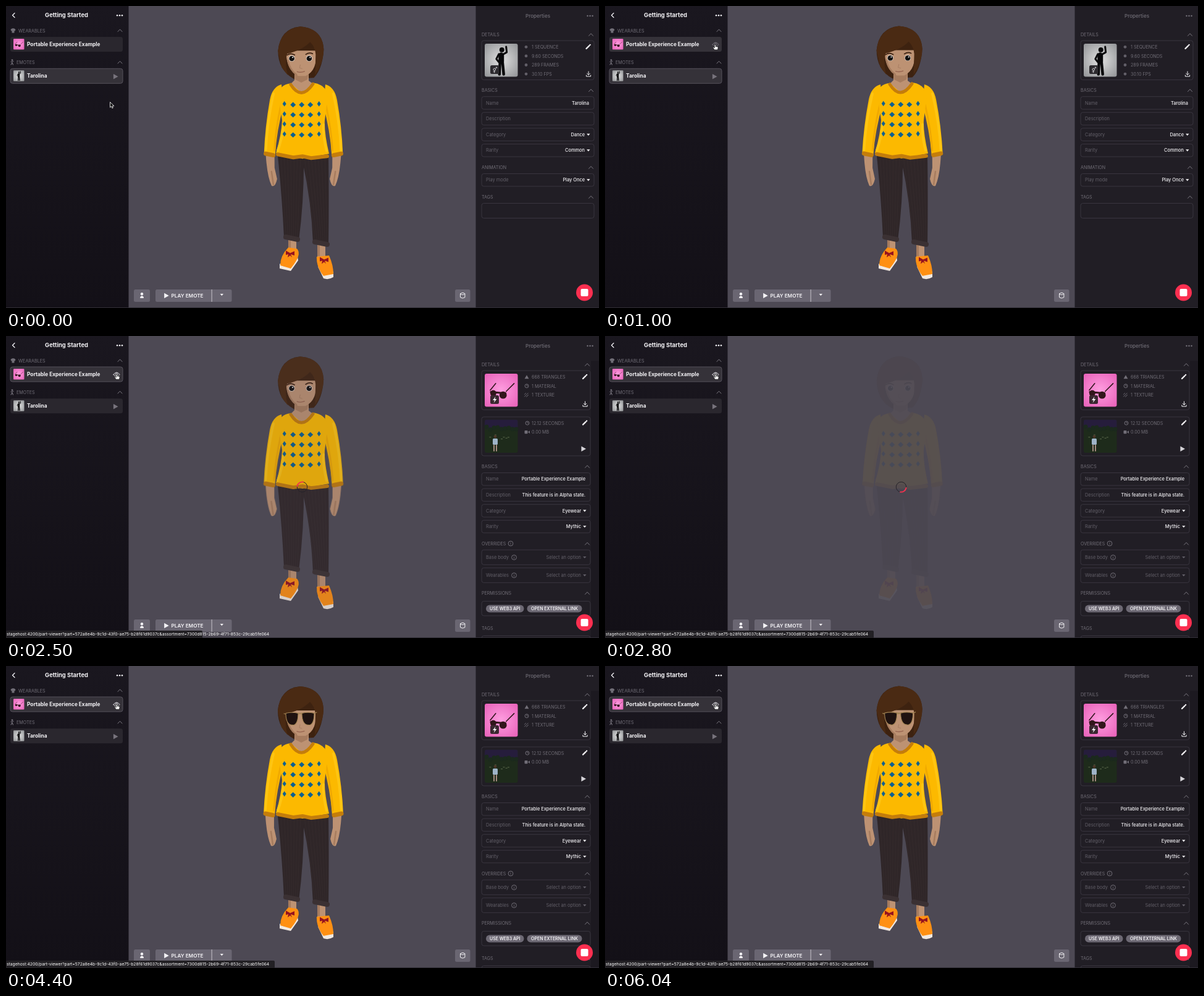
An HTML page for the animation above (6.17 s loop, 960 by 489 pixels).

```html
<!DOCTYPE html>
<html lang="en">
<head>
<meta charset="utf-8">
<title>Item editor</title>
<style>
html, body { margin: 0; width: 100%; height: 100%; overflow: hidden; background: #18141b; }
svg { display: block; width: 100vw; height: 100vh; font-family: Inter, sans-serif; }
</style>
</head>
<body>
<svg id="stage" viewBox="0 0 960 489"></svg>
<script>
const LOOP = 6170, SELECT = 2400, READY = 3600;
const GREY = '#716e77', DIM = '#625f68', WHITE = '#f4f3f6', LINE = '#39353f';

// ---- markup helpers ----
const shape = (d, fill) => `<path d="${d}" fill="${fill}"/>`;
const line = (d, stroke, width = 1, fill = 'none') =>
  `<path d="${d}" fill="${fill}" stroke="${stroke}" stroke-width="${width}" stroke-linecap="round" stroke-linejoin="round"/>`;
const rect = (x, y, w, h, fill, r = 0, stroke = 'none') =>
  `<rect x="${x}" y="${y}" width="${w}" height="${h}" rx="${r}" fill="${fill}" stroke="${stroke}"/>`;
const circle = (x, y, r, fill, stroke = 'none') =>
  `<circle cx="${x}" cy="${y}" r="${r}" fill="${fill}" stroke="${stroke}"/>`;
const text = (x, y, s, size = 7.1, fill = GREY, weight = 400, anchor = 'start') =>
  `<text x="${x}" y="${y}" font-size="${size}" fill="${fill}" font-weight="${weight}" text-anchor="${anchor}">${s}</text>`;
const group = (id, body) => `<g id="${id}">${body}</g>`;
const at = (x, y, body, scale = 1) => `<g transform="translate(${x} ${y}) scale(${scale})">${body}</g>`;
const mirror = (axis, body) => `<g transform="translate(${2 * axis} 0) scale(-1 1)">${body}</g>`;
const repeat = (n, fn) => Array.from({ length: n }, (_, i) => fn(i)).join('');
const mix = (a, b, k) => a + (b - a) * k;

// ---- icons ----
const chevron = (x, y) => at(x, y, line('M-3.5 2L0-1.7 3.5 2', '#85828b', .9));
const caret = (x, y, fill = WHITE) => at(x, y, shape('M-2.7-1.4H2.7L0 1.8Z', fill));
const playMark = (x, y, fill) => at(x, y, shape('M-3.6-4.2L4 0-3.6 4.2Z', fill));
const dots = (x, y, fill) => repeat(3, i => circle(x + 4 * (i - 1), y, 1.25, fill));
const pencil = (x, y) => at(x, y, line('M-3 3L1.5-1.5M3-3L3.1-3.1', WHITE, 2.4));
const download = (x, y) => at(x, y, line('M0-4V1.5M-2.4-.8L0 1.6 2.4-.8M-3.6 2v2h7.2V2', WHITE));
const info = (x, y) => circle(x, y, 3.9, 'none', GREY) + text(x, y + 2.2, 'i', 6, GREY, 500, 'middle');
const clock = (x, y) => at(x, y, circle(0, 0, 3, 'none', GREY) + line('M0-2V0H1.5', GREY, .8));
const eye = (x, y) => at(x, y, line('M-5 0Q0-7 5 0Q0 7-5 0Z', 'currentColor') + circle(0, 0, 1.9, 'none', 'currentColor'));

const INK = '#08080a', LENS = '#32161c';
const posing = circle(1, -17, 4, INK) + line('M0-8V2', INK, 9) +
  line('M-2 2L-3 23M2 2L4 23', INK, 4.5) + line('M4-10L9-13 8-22M-4-10L-8-2-4 3', INK, 3);
const shades = line('M8 2L21-11M-18 0L-9-11', LENS, 1.6) + line('M-17 3L7 5', LENS, 3) +
  circle(-13, 5, 5, LENS) + circle(3, 8, 6, LENS);

const tile = (x, y, size, fill, icon) =>
  rect(x, y, size, size, `url(#${fill})`, size / 18) + at(x + size / 2, y + size / 2, icon, size / 54);

// ---- left bar ----
const row = (id, y, label, thumb) =>
  `<rect id="${id}" x="7" y="${y - 12}" width="182" height="24" rx="3.5"/>` +
  tile(12, y - 9, 17.5, ...thumb) + text(34, y + 3, label, 8.3, WHITE, 700);

const leftBar = rect(0, 0, 198.5, 489, 'url(#bar)') +
  line('M14 11.5L10.5 15l3.5 3.5', WHITE, 1.3) +
  text(98, 18.4, 'Getting Started', 9.4, WHITE, 700, 'middle') + dots(184, 15.3, WHITE) +
  at(11.5, 40, shape('M-4-2L-1.5-3.7H1.5L4-2 3 .5 2 0V3.5H-2V0L-3 .5Z', GREY)) +
  text(20, 42.5, 'WEARABLES', 7.2) + chevron(184.5, 39.5) +
  row('rowA', 62, 'Portable Experience Example', ['pink', shades]) +
  circle(10, 87.6, 1.4, GREY) + line('M8 90.5l4-1M10 90v2l-2 3M10 92l1.5 3', GREY, 1.2) +
  text(17, 93.6, 'EMOTES', 7.2) + chevron(184.5, 91) +
  row('rowB', 113.3, 'Tarolina', ['silver', posing]) +
  playMark(177.5, 114.3, '#77737c') + group('eye', eye(179, 62.4));

// ---- right bar ----
const box = (y, h, right) => rect(770, y - h / 2, right - 770, h, 'none', 3.5, LINE);
const head = (y, title, right) => text(770, y + 2.6, title) + chevron(right - 5, y);
const stats = (y, list, icons) => list.map((s, i) => text(851, y + 14.6 * i + 2.6, s) + at(842.5, y + 14.6 * i, icons(i))).join('');

function field(y, h, right, [label, value, kind = 'plain']) {
  const menu = kind !== 'plain', fill = kind === 'empty' ? DIM : WHITE;
  return box(y, h, right) + text(777, y + 2.7, label, 7.4, DIM) +
    text(right - (menu ? 15 : 8), y + 2.7, value, 7.4, fill, kind === 'empty' ? 400 : 500, 'end') +
    (menu ? caret(right - 9.2, y, fill) : '');
}

// stacks titled sections of equally tall fields
function sections(y, right, list) {
  return list.map(([title, h, rows]) => {
    let out = head(y, title, right);
    y += 10.2 + h / 2;
    rows.forEach((r, i) => { out += field(y, h, right, r); if (i < rows.length - 1) y += h + 5.1; });
    y += h / 2 + 17.3;
    return out;
  }).join('');
}

const gender = line('M1.4-1.3L3.8-3.7H2.2M3.8-3.7v1.6M-.3 2v3M-1.6 3.6h2.6', '#d5d3d8', .8) + circle(0, 0, 1.8, 'none', '#d5d3d8');
const emotePanel = head(46.3, 'DETAILS', 952) + box(87.8, 63.5, 952) + tile(775, 61, 53.5, 'silver', posing) +
  rect(784, 96, 14.5, 14, '#2c2a2e', 2.5) + at(790.8, 102.8, gender) +
  stats(66.3, ['1 SEQUENCE', '9.60 SECONDS', '289 FRAMES', '30.10 FPS'], () => circle(-.5, 0, 2.4, DIM)) +
  pencil(942.5, 66) + download(943, 110) +
  sections(136.5, 952, [
    ['BASICS', 20.5, [['Name', 'Tarolina'], ['Description', ''], ['Category', 'Dance', 'menu'], ['Rarity', 'Common', 'menu']]],
    ['ANIMATION', 20.5, [['Play mode', 'Play Once', 'menu']]],
    ['TAGS', 24, [['', '']]]
  ]);

let seed = 7;
const random = () => (seed = seed * 16807 % 2147483647) / 2147483647;
const clip = rect(775, 135.5, 53.5, 53.5, '#1e2b1b', 3) + rect(775, 135.5, 53.5, 15, '#261d3c', 3) +
  repeat(9, i => circle(778 + i * 6, 147 + random() * 5, 3.5, '#1b291d')) +
  repeat(6, () => rect(780 + random() * 45, 155 + random() * 12, 3, 1.2, '#526044')) +
  circle(792, 163, 2.4, '#4a3427') + rect(788, 166, 8, 10, '#9fb4c8', 1.5) + line('M790 177v9M794 177v9', '#a58a80', 2);

const pill = (x, w, s) => rect(x, 435.5, w, 12, '#6d6974', 6) + text(x + w / 2, 444, s, 7, WHITE, 600, 'middle');
const materialIcons = i => [shape('M-3 3L.5-3 4 3Z', GREY), clock(.5, 0), line('M-3-1l2-2M-3 2.6l5.6-5.6M0 3l3-3', GREY)][i];
const clipIcons = i => [clock(1.5, 0), rect(-3, -2.6, 5, 5.2, GREY, 1) + shape('M2.5 0L5.5-2.4V2.4Z', GREY)][i];

const wearPanel = rect(947, 40, 13, 449, '#1c1920') +
  head(46.3, 'DETAILS', 946) + box(87.8, 63.5, 946) + tile(775, 61, 53.5, 'pink', shades) +
  rect(784, 96, 14, 14, '#3a2730', 2.5) + at(791, 103, shape('M1.5-5L-3 1H0L-1.5 5.5 3.4-1H.4Z', WHITE)) +
  stats(66.3, ['668 TRIANGLES', '1 MATERIAL', '1 TEXTURE'], materialIcons) + pencil(937, 66) + download(937.5, 110) +
  box(162.5, 63, 946) + clip + stats(141, ['12.12 SECONDS', '0.00 MB'], clipIcons) +
  pencil(937, 140.5) + playMark(935, 182.7, '#d6d4d9') +
  sections(211.3, 946, [
    ['BASICS', 20.5, [['Name', 'Portable Experience Example'], ['Description', 'This feature is in Alpha state.'], ['Category', 'Eyewear', 'menu'], ['Rarity', 'Mythic', 'menu']]],
    ['OVERRIDES', 24, [['Base body', 'Select an option', 'empty'], ['Wearables', 'Select an option', 'empty']]]
  ]) + info(817, 336) + info(822.5, 358.5) + info(822.5, 387.5) +
  head(416.3, 'PERMISSIONS', 946) + box(441.2, 23.5, 946) +
  pill(777, 61.5, 'USE WEB3 API') + pill(843.5, 89, 'OPEN EXTERNAL LINK') +
  head(473.6, 'TAGS', 946) + box(497, 23, 946);

// ---- avatar ----
const SKIN = '#bd9273', SHADE = '#a67c5f', YELLOW = '#fcb900', OCHRE = '#c47d0b';
const HAIR = '#4a2a13', GOLD = '#a18252', PANTS = '#2f2628';

// a tapered trouser leg with pinstripes and a turned-up cuff
function leg(topL, topR, footL, footR, foot) {
  const stripe = i => line(`M${mix(topL, topR, i / 8)} 247L${mix(footL, footR, i / 8)} ${foot - 8}`, '#372d2f', .7);
  return shape(`M${topL} 243H${topR}Q${topR + 1} 310 ${footR - 1} ${foot}L${footL} ${foot - 5}Q${footL - 3} 310 ${topL} 243Z`, PANTS) +
    repeat(7, i => stripe(i + 1)) + line(`M${footL + 3} ${foot - 6}L${footR - 3} ${foot - 2}`, '#3b3133', 8);
}
const ankle = (x, y) => rect(x, y, 13, 20, SKIN) + rect(x, y, 4, 18, SHADE);
const bow = (x, y) => at(x, y, shape('M-7-5L0-1 7-4V3L1 1 3 6 0 3-4 6-3 1-7 2Z', '#96131f'));
const ORANGE = '#ff9013', SOLE = '#f1e9e2';
const shoes =
  shape('M443 417Q455 430 472 406L473 412 461 429 443 425Z', SOLE) +
  shape('M457 391L471 393Q480 402 461 425L444 420Q444 404 457 391Z', ORANGE) + bow(460, 401) +
  shape('M505 422L530 430V439Q522 444 514 441Z', SOLE) +
  shape('M503 406L523 404Q530 420 530 434L514 437Q502 422 503 406Z', ORANGE) + bow(515, 411.5);

const legs = ankle(457, 376) + ankle(504, 387) + shoes +
  leg(440, 482, 450, 475, 380) + leg(478, 522, 497, 523, 388);

const arm = shape('M420 242Q422 276 429 291Q435 294 438 280L434 262V244Z', SKIN) + line('M429 268L432 289', SHADE, 2.5) +
  shape('M446 127Q431 131 427 152Q419 195 417 240L435 242Q438 200 449 162Z', YELLOW) +
  line('M433 142Q422 190 420 234', '#ffc512', 4) + line('M445 160Q436 200 434 234', '#f0a900', 3) +
  line('M420 239L432 241.5', OCHRE, 7);

const diamonds = repeat(20, n => {
  const col = n % 5 - 2, edge = Math.abs(col) === 2;
  const w = edge ? 3 : 4.5;
  return at(478.7 + col * 14, 159.7 + Math.floor(n / 5) * 16.3 - (edge ? 1.5 : 0), shape(`M${-w} 0L0-4.3 ${w} 0 0 4.3Z`, '#0b6090'));
});
const torso = shape('M461 125Q442 127 441 145L447 185Q446 207 437 238L480 247 523 239Q515 205 516 185L521 145Q518 127 497 124L480 142Z', YELLOW) +
  line('M449 192Q448 212 440 234M514 192Q513 212 519 234', '#ffc512', 4) +
  line('M461 127Q478 154 497 126', OCHRE, 5) + line('M440 240L465 245 480 243 494 246 520 243', OCHRE, 6) + diamonds;

const openEye = x => circle(x, 84.5, 5, '#e6ddd7') + circle(x, 84.6, 4.3, '#12100f') + circle(x + 1.5, 83, 1, '#fff');
const lens = x => at(x, 76, line('M-10 .5Q0-2 10 .5Q10 17 3 19.5Q-10 21-10 .5Z', GOLD, 1.1, '#1f1210'));

const hairBack = shape('M476 33Q512 36 514 70Q512 102 498 116L466 118Q440 104 440 72Q444 36 476 33Z', '#3d2210');
const neck = shape('M467 104H490V121L497 126Q478 151 461 126L467 120Z', SKIN) + shape('M467 108H490L488 119 478 124 468 119Z', SHADE);
const face = shape('M453 72H501Q505 103 485 113H473Q453 104 453 72Z', SKIN) + line('M456 88Q459 103 470 111', SHADE, 2.5) +
  line('M476 95l-1 5 4 1', '#a87e62') + line('M471 106q6 2 12-.5', '#96634f', 1.3) +
  shape('M476 33Q443 38 440 73L446 99 456 112Q450 90 455 77Q480 71 492 58Q500 66 501 78L500 112Q514 90 514 70Q512 36 476 33Z', HAIR);
const bareEyes = openEye(462.3) + openEye(490.5) + line('M455 79q5-4 12 0M485 78q6-4 11-1', '#3b2111', 1.7);
const worn = line('M453 78l-3-1M498 77l5-2M472 79q4-3 8 0M470 76.5h12', GOLD, 1.1) + lens(463) + lens(489);

const avatar = legs + group('armL', arm) + group('armR', mirror(481.5, arm)) +
  group('back', hairBack) + neck + group('torso', torso) +
  group('head', face + group('bare', bareEyes) + group('worn', worn));

// ---- viewport controls ----
const BUTTON = '#6a6672';
const controls = rect(207, 459, 26, 20, BUTTON, 2.5) + circle(220, 466.3, 2.2, WHITE) + line('M217.5 472.2q0-2.4 2.5-2.4t2.5 2.4z', WHITE, 1, WHITE) +
  rect(242, 459, 123.5, 20, BUTTON, 2.5) + rect(332.6, 459, 1, 20, '#c8c6cc') +
  playMark(259.7, 469, WHITE) + text(267.5, 472, 'PLAY EMOTE', 8.2, WHITE, 600) + caret(349.3, 467.5) +
  rect(727, 459, 24.5, 20, BUTTON, 2.5) +
  at(739.2, 466, line('M-3.7 0V5.8Q0 8.4 3.7 5.8V0Q0-3.4-3.7 0Q0 3 3.7 0', WHITE));

const spinner = circle(0, 0, 8.2, 'none', '#25222a') + group('arc', line('M8.2 0A8.2 8.2 0 0 1 0 8.2', '#f5324f', 1.8));
const arrow = line('M0 0V8.2L2 6.4 3.4 9.5 4.8 8.9 3.4 5.9H6.1Z', '#fff', .8, '#0a0a0a');
const hand = line('M-1 .4Q0-.7 1 .4V3.4Q5 2.4 4.9 5.2L4.2 8.4H-1L-3.5 4.8Q-3.4 3.4-1 5Z', '#111', .7, '#fff');

const link = 'stagehost:4200/part-viewer?part=572a8e4b-9c1d-43f0-ae75-b28f61d9037c&amp;assortment=';
const shortLink = link + '7300...', longLink = link + '7300d815-2b69-4f71-853c-29cab5fe064';

const grad = (id, inner, outer) => `<radialGradient id="${id}" r=".72"><stop stop-color="${inner}"/><stop offset="1" stop-color="${outer}"/></radialGradient>`;

document.getElementById('stage').innerHTML =
  `<defs>${grad('pink', '#ff9ee0', '#e75fb8')}${grad('silver', '#e2e2e2', '#909295')}
  <linearGradient id="bar" x2="0" y2="1"><stop stop-color="#1a171f"/><stop offset="1" stop-color="#131017"/></linearGradient></defs>` +
  rect(0, 0, 960, 489, '#4d4954') + group('avatar', avatar) +
  group('spinner', at(479.5, 244.5, spinner)) + controls + leftBar +
  rect(760.5, 0, 199.5, 489, '#211e25') + text(861, 19, 'Properties', 8.1, GREY, 500, 'middle') + dots(945.5, 16, GREY) +
  group('emotePanel', emotePanel) + group('wearPanel', wearPanel) +
  circle(936.5, 464, 13.5, '#fb2f50') + rect(930.5, 458, 12, 12, '#fff', 2) +
  rect(0, 488, 960, 1, '#302d35') +
  group('status', `<rect id="statusBox" y="477" height="13" rx="2" fill="#222024"/><text id="statusText" x="1" y="485.2" font-size="6.78" fill="#fff"></text>`) +
  group('cursor', group('arrow', arrow) + group('hand', hand));

// ---- motion ----
const $ = Object.fromEntries([...document.querySelectorAll('[id]')].map(el => [el.id, el]));
const ramp = (t, from, to) => Math.max(0, Math.min(1, (t - from) / (to - from)));
const smooth = v => v * v * (3 - 2 * v);
const set = (id, name, value) => $[id].setAttribute(name, value);
const show = (id, on) => set(id, 'display', on ? 'inline' : 'none');
let shownLink = '';

function paintRow(id, lit, picked) {
  set(id, 'fill', lit ? '#353239' : '#2a272e');
  set(id, 'stroke', picked ? '#55515b' : 'none');
}

function draw(t) {
  const picked = t >= SELECT, ready = t >= READY;

  // idle breathing restarts once the new outfit is ready
  const breath = Math.cos((t - (ready ? 3850 : 950)) / 2300 * Math.PI * 2);
  const nod = `translate(${-.4 * breath} ${-.4 * breath})`;
  set('armL', 'transform', `rotate(${.4 * breath} 444 132)`);
  set('armR', 'transform', `rotate(${-.4 * breath} 519 132)`);
  set('torso', 'transform', `translate(0 ${-.25 * breath})`);
  set('head', 'transform', nod);
  set('back', 'transform', nod);
  set('avatar', 'opacity', ready ? 1 : 1 - .93 * ramp(t, 2450, 2750));
  show('bare', !ready);
  show('worn', ready);

  show('spinner', t >= 2500 && !ready);
  set('arc', 'transform', `rotate(${10 + (Math.min(t, 3400) - 2800) * .6})`);
  show('emotePanel', !picked);
  show('wearPanel', picked);

  const go = smooth(ramp(t, 150, 850)), nudge = smooth(ramp(t, 1300, 1800));
  const x = 168.5 + 9.7 * go + nudge, y = 156 - 93.5 * go - .7 * nudge;
  const overA = y < 74, overB = y > 101 && y < 125.5;
  set('cursor', 'transform', `translate(${x} ${y})`);
  show('arrow', !overA && !overB);
  show('hand', overA || overB);
  show('eye', overA);
  set('eye', 'color', picked ? '#e5e3e8' : '#77737c');
  paintRow('rowA', overA, picked);
  paintRow('rowB', overB || !picked, !picked);

  const grow = smooth(ramp(t, 2500, 2700)), next = grow > 0 ? longLink : shortLink;
  set('status', 'opacity', ramp(t, 1100, 1300));
  set('statusBox', 'width', mix(318, 435, grow));
  if (next !== shownLink) $.statusText.innerHTML = shownLink = next;
}

const start = performance.now();
function tick() {
  draw((performance.now() - start) % LOOP);
  requestAnimationFrame(tick);
}
draw(0);
requestAnimationFrame(tick);
</script>
</body>
</html>
```
